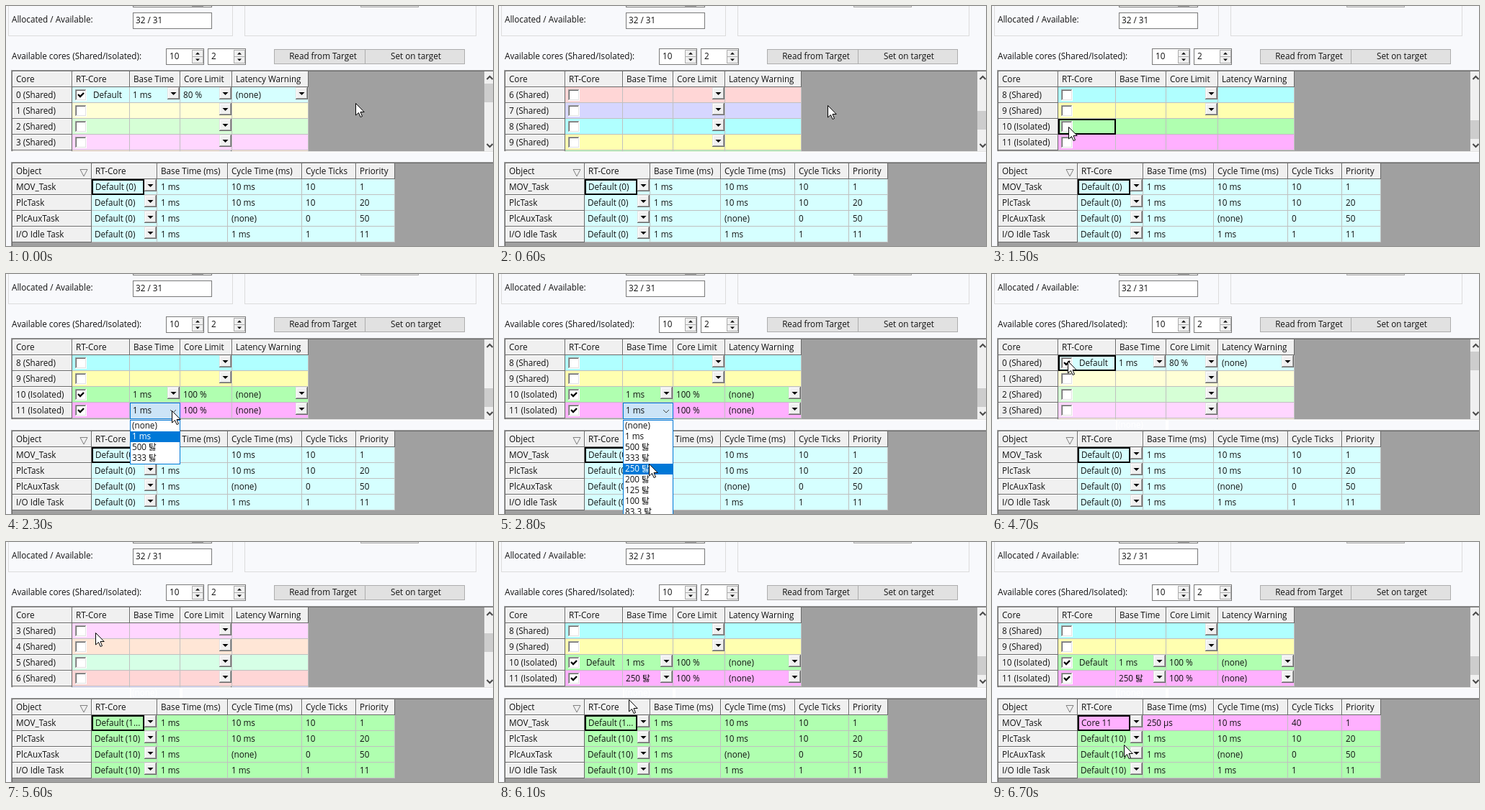
These frames come from a looping animation (676x334 px, 9700 ms). An HTML page with a canvas:

```html
<!DOCTYPE html>
<html lang="en">
<head>
<meta charset="utf-8">
<title>Core settings</title>
<style>
html, body { margin: 0; width: 100%; height: 100%; overflow: hidden; background: #f8f9fc; }
canvas { display: block; }
</style>
</head>
<body>
<canvas id="stage" width="676" height="334"></canvas>
<script>
const ctx = document.getElementById('stage').getContext('2d');
const LOOP = 9700, STEP = 100;
const GRAY = '#a0a0a0', DARK = '#696969', LIGHT = '#e3e3e3', FACE = '#f0f0f0';
const BLUE = '#0078d7', PALE = '#f8f9fc';
const FONT = '11.7px "Open Sans", "Noto Sans CJK KR", "Noto Sans CJK", sans-serif';

const CORE_COLORS = ['#d6ffff', '#ffffd6', '#d6ffd6', '#ffd6ff', '#ffe6d6', '#d6ffe6',
  '#ffd6d6', '#d6d6ff', '#b0ffff', '#ffffb0', '#b0ffb0', '#ffb0ff'];
const CORE_EDGES = [8, 91, 171, 241, 313, 419];
const TASK_EDGES = [8, 118, 209, 307, 410, 485, 539];
const CORE_HEAD = ['Core', 'RT-Core', 'Base Time', 'Core Limit', 'Latency Warning'];
const TASK_HEAD = ['Object', 'RT-Core', 'Base Time (ms)', 'Cycle Time (ms)', 'Cycle Ticks', 'Priority'];
const TASKS = [['MOV_Task', '10 ms', '10', '1'], ['PlcTask', '10 ms', '10', '20'],
  ['PlcAuxTask', '(none)', '0', '50'], ['I/O Idle Task', '1 ms', '1', '11']];
const BASE_TIMES = ['(none)', '1 ms', '500 탏', '333 탏', '250 탏', '200 탏', '125 탏', '100 탏', '83.3 탏'];
const CORE_CHOICES = ['Default (10)', 'Core 10', 'Core 11'];

// Pointer path: time, x, y
const POINTER = [[0, 486, 135], [300, 486, 135], [600, 457, 138], [800, 450, 140], [1300, 112, 166],
  [1500, 107, 168], [1600, 107, 168], [1800, 104, 188], [1900, 104, 188], [2200, 231, 190],
  [2300, 231, 190], [2800, 209, 264], [3600, 209, 264], [4000, 190, 160], [4400, 112, 126],
  [4700, 106, 121], [4800, 106, 121], [5000, 125, 126], [5800, 125, 126], [6200, 200, 250],
  [6300, 200, 250], [6500, 165, 294], [6600, 165, 294], [6700, 184, 282], [LOOP, 184, 282]];
// Time, first visible core
const SCROLL = [[0, 0], [500, 3], [600, 6], [700, 8], [4000, 5], [4100, 2], [4200, 0],
  [5600, 3], [5700, 6], [5800, 8]];
// Time, core, column
const FOCUS = [[0, -1, 0], [1500, 10, 1], [1900, 11, 1], [2300, -1, 0], [3600, 11, 2], [4600, 0, 1]];

const latest = (keys, t) => keys.filter(k => k[0] <= t).pop();
const between = (t, a, b) => t >= a && t < b;

function pointerAt(t) {
  const i = POINTER.findIndex(k => k[0] > t);
  const [t0, x0, y0] = POINTER[i - 1], [t1, x1, y1] = POINTER[i];
  const p = (t - t0) / (t1 - t0);
  return { x: Math.round(x0 + (x1 - x0) * p), y: Math.round(y0 + (y1 - y0) * p) };
}

function rect(x, y, w, h, color) {
  ctx.fillStyle = color;
  ctx.fillRect(x, y, w, h);
}
function box(x, y, w, h, fill, border) {
  rect(x, y, w, h, border);
  rect(x + 1, y + 1, w - 2, h - 2, fill);
}
// Filled box with one colour on the top and left edges, another on the others
function bevel(x, y, w, h, topLeft, bottomRight, fill) {
  rect(x, y, w, h, bottomRight);
  rect(x, y, w - 1, h - 1, topLeft);
  rect(x + 1, y + 1, w - 2, h - 2, fill);
}
function outline(x, y, w, h, color, width = 1) {
  ctx.strokeStyle = color;
  ctx.lineWidth = width;
  ctx.strokeRect(x + width / 2, y + width / 2, w - width, h - width);
}
function text(str, x, middle, color = '#111', align = 'left') {
  ctx.fillStyle = color;
  ctx.textAlign = align;
  ctx.fillText(str, x, middle + 4);
}
function path(points, { fill, stroke, close, width = 1 }) {
  ctx.beginPath();
  points.forEach(([x, y]) => ctx.lineTo(x, y));
  if (close) ctx.closePath();
  if (fill) { ctx.fillStyle = fill; ctx.fill(); }
  if (stroke) { ctx.strokeStyle = stroke; ctx.lineWidth = width; ctx.stroke(); }
}
function chevron(x, y, r, dir, width) {
  path([[x - r, y - dir * r / 2], [x, y + dir * r / 2], [x + r, y - dir * r / 2]], { stroke: '#484848', width });
}
function triangle(x, y, r, dir) {
  path([[x - r, y], [x + r, y], [x, y + dir * r]], { fill: '#000', close: true });
}
function comboButton(right, y) {
  const x = right - 17;
  bevel(x, y, 17, 17, LIGHT, DARK, FACE);
  bevel(x + 1, y + 1, 15, 15, '#fff', GRAY, FACE);
  triangle(x + 8.5, y + 7, 4, 1);
}
function spinner(x, value) {
  box(x, 59, 53, 23, '#fff', '#7a7a7a');
  text(value, x + 5, 70);
  box(x + 36, 61, 16, 10, FACE, '#acacac');
  box(x + 36, 70, 16, 10, FACE, '#acacac');
  triangle(x + 44, 67.5, 3, -1);
  triangle(x + 44, 73.5, 3, 1);
}
function button(x, w, label, center) {
  box(x, 60, w, 21, '#e1e1e1', '#adadad');
  text(label, center, 70, '#111', 'center');
}
function checkBox(x, y, checked) {
  bevel(x, y, 16, 16, GRAY, '#fff', '#fff');
  bevel(x + 1, y + 1, 14, 14, DARK, LIGHT, '#fff');
  if (checked) path([[x + 4, y + 7], [x + 7, y + 10], [x + 12, y + 5]], { stroke: '#000', width: 2.4 });
}
function gridFrame(top, bottom) {
  const h = bottom - top;
  rect(7, top, 669, h, GRAY);
  rect(8, top + 1, 668, h - 1, DARK);
  rect(9, top + 2, 667, h - 2, GRAY);
  rect(8, bottom, 668, 1, LIGHT);
  rect(7, bottom + 1, 669, 1, '#fff');
}
function gridRow(edges, y, color) {
  for (let i = 1; i < edges.length; i++) {
    const x = edges[i - 1] + 1, w = edges[i] - edges[i - 1];
    if (i === 1 || color === FACE) bevel(x, y, w, 22, '#fff', DARK, FACE);
    else {
      rect(x, y, w, 22, '#c0c0c0');
      rect(x, y, w - 1, 21, color);
    }
  }
}
function headRow(edges, labels, y) {
  gridRow(edges, y, FACE);
  labels.forEach((label, i) => text(label, edges[i] + 6, y + 11));
}
function dropList(x, y, w, h, items, hover) {
  box(x, y, w, h, '#fff', BLUE);
  ctx.save();
  ctx.beginPath();
  ctx.rect(x, y, w, h);
  ctx.clip();
  items.forEach((item, i) => {
    const top = y + 15 * i;
    if (i === hover) rect(x + 1, top + 1, w - 2, 15, BLUE);
    text(item, x + 3, top + 8, i === hover ? '#fff' : '#111');
  });
  ctx.restore();
}

function drawPanel() {
  rect(0, 0, 676, 334, PALE);
  outline(3, -5, 312, 47, '#dcdcdc');
  outline(331, -5, 322, 47, '#dcdcdc');
  box(176, -19, 110, 21, '#fff', '#7a7a7a');
  box(258, -9, 16, 10, FACE, '#acacac');
  box(492, -19, 81, 21, '#e1e1e1', '#adadad');
  text('Allocated / Available:', 8, 19);
  box(176, 9, 110, 23, '#fff', '#7a7a7a');
  text('32 / 31', 180, 20);
  text('Available cores (Shared/Isolated):', 8, 70);
  spinner(222, '10');
  spinner(280, '2');
  button(372, 127, 'Read from Target', 440);
  button(498, 139, 'Set on target', 569);
}

function drawCore(core, y, t) {
  const isolated = core > 9, mid = y + 11;
  const checked = core === 0 ? t < 4800 : core === 10 ? t >= 1600 : core === 11 && t >= 1900;
  gridRow(CORE_EDGES, y, CORE_COLORS[core]);
  text(`${core} (${isolated ? 'Isolated' : 'Shared'})`, 14, mid);
  checkBox(96, y + 3, checked);
  if (!isolated) comboButton(313, y);
  if (checked) {
    if (core === (t < 4800 ? 0 : 10)) text('Default', 121, mid);
    text(core === 11 && t >= 3600 ? '250 탏' : '1 ms', 176, mid);
    text(isolated ? '100 %' : '80 %', 246, mid);
    text('(none)', 319, mid);
    comboButton(241, y);
    comboButton(419, y);
  }
  const [, row, col] = latest(FOCUS, t);
  if (row === core) outline(CORE_EDGES[col] + 1, y, CORE_EDGES[col + 1] - CORE_EDGES[col], 22, '#000', 2);
}

function drawCores(t) {
  const first = latest(SCROLL, t)[1];
  gridFrame(89, 202);
  headRow(CORE_EDGES, CORE_HEAD, 91);
  ctx.save();
  ctx.beginPath();
  ctx.rect(9, 113, 655, 89);
  ctx.clip();
  for (let i = 0; i < 5 && first + i < 12; i++) drawCore(first + i, 113 + 22 * i, t);
  ctx.restore();
  rect(664, 91, 12, 111, FACE);
  rect(664, 108 + Math.round(first * 6.375), 12, 26, '#cdcdcd');
  chevron(671.5, 100, 4, -1, 2);
  chevron(671.5, 194, 4, 1, 2);
}

function drawTasks(t) {
  const moved = t >= 4900, picked = t >= 6600;
  gridFrame(217, 340);
  headRow(TASK_EDGES, TASK_HEAD, 219);
  path([[103, 227.5], [113, 227.5], [108, 237]], { stroke: '#808080', fill: FACE, close: true });
  TASKS.forEach(([name, cycle, ticks, priority], i) => {
    const y = 241 + 22 * i, mid = y + 11, special = picked && i === 0;
    gridRow(TASK_EDGES, y, CORE_COLORS[special ? 11 : moved ? 10 : 0]);
    const shown = special ? 'Core 11' : !moved ? 'Default (0)' : i ? 'Default (10)' : 'Default (1...';
    text(name, 14, mid);
    text(shown, i ? 123 : 124, mid);
    comboButton(209, y);
    [special ? '250 µs' : '1 ms', cycle, special ? '40' : ticks, priority]
      .forEach((value, k) => text(value, TASK_EDGES[k + 2] + 6, mid));
  });
  outline(119, 241, 73, 22, '#000', 2);
}

function drawLists(t, pointer) {
  const hover = (top, idle) => pointer.y < top ? idle : Math.floor((pointer.y - top) / 15);
  if (between(t, 2300, 3600)) {
    box(172, 179, 70, 23, '#cce4f7', BLUE);
    text('1 ms', 176, 190);
    chevron(232, 191, 4, 1, 1);
    dropList(172, 203, 70, t < 2400 ? 62 : 145, BASE_TIMES, hover(204, 1));
  }
  if (between(t, 6300, 6600)) dropList(119, 262, 90, 47, CORE_CHOICES, hover(263, 0));
}

// Faint trace left between the tables once the list has closed
function drawTrace() {
  text('(none)', 175, 210, '#fff');
  rect(172, 203, 2, 14, '#fff');
  rect(241, 203, 4, 14, '#fff');
}

function drawPointer({ x, y }) {
  const shape = [[0, 0], [0, 16.5], [4, 13], [6.6, 19], [9, 18], [6.5, 12], [11.7, 12]];
  path(shape.map(([dx, dy]) => [x + dx - 0.5, y + dy + 0.5]), { fill: '#fff', stroke: '#000', close: true });
}

function draw(now) {
  const t = Math.floor((now % LOOP) / STEP) * STEP;
  const pointer = pointerAt(t);
  ctx.font = FONT;
  drawPanel();
  if (t >= 3600) drawTrace();
  drawCores(t);
  drawTasks(t);
  drawLists(t, pointer);
  drawPointer(pointer);
}

const start = performance.now();
function tick() {
  draw(performance.now() - start);
  requestAnimationFrame(tick);
}
tick();
</script>
</body>
</html>
```
